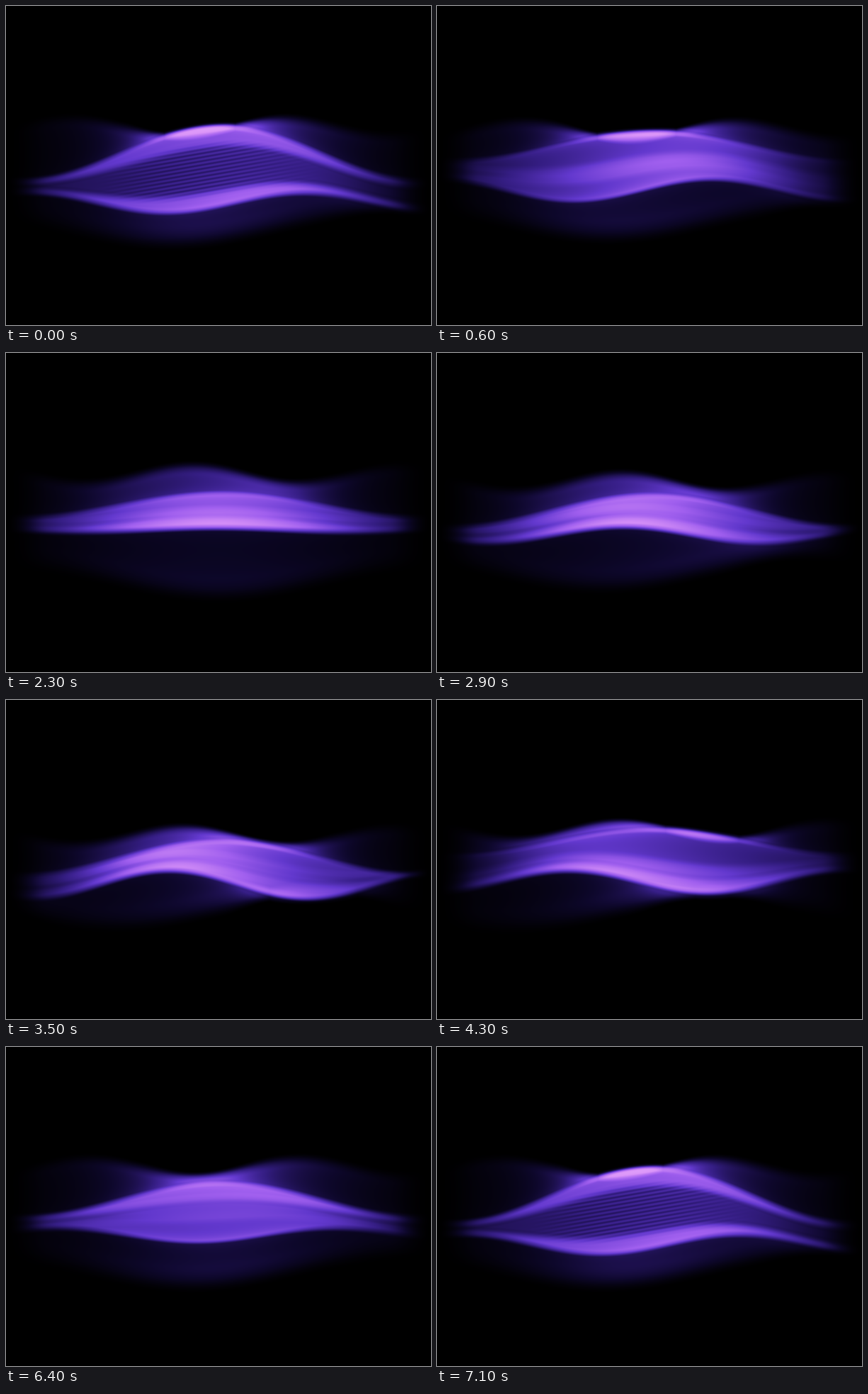
These frames come from a looping animation (600 by 450 pixels, 7.2 s). An HTML page with a canvas:

```html
<!DOCTYPE html>
<html lang="en">
<head>
<meta charset="utf-8">
<title>Violet wave</title>
<style>
  html, body { margin: 0; height: 100%; overflow: hidden; background: #000; }
  canvas { display: block; width: 600px; height: 450px; }
</style>
</head>
<body>
<canvas id="stage" width="600" height="450"></canvas>
<script>
const W = 600, H = 450, MID = W / 2, LOOP = 7200, STEP = 100, TAU = Math.PI * 2;
const ctx = document.getElementById('stage').getContext('2d');
const image = ctx.createImageData(W, H);
const light = new Float32Array(W * H);

const clamp = v => Math.min(1, Math.max(0, v));
const mix = (a, b, u) => a + (b - a) * u;
const smooth = v => { v = clamp(v); return v * v * (3 - 2 * v); };

// Turning points of the swell; every track below has one key at each.
const moments = [0, 1300, 2300, 3500, 5200, 6400];

// Looping smooth curve through keys; drift is the gain over one whole loop.
function track(keys, drift = 0) {
  const n = keys.length;
  const key = i => {
    const turn = Math.floor(i / n), k = i - turn * n;
    return { time: moments[k] + turn * LOOP, value: keys[k] + turn * drift };
  };
  return time => {
    let i = n - 1;
    while (moments[i] > time) i--;
    const [p, a, b, q] = [i - 1, i, i + 1, i + 2].map(key);
    const span = b.time - a.time, u = (time - a.time) / span;
    const slopeA = (b.value - p.value) * span / (b.time - p.time);
    const slopeB = (q.value - a.value) * span / (q.time - a.time);
    return mix(a.value, b.value, smooth(u))
      + u * (1 - u) * (slopeA * (1 - u) - slopeB * u);
  };
}

// A fold is one sine wave: level, swell height, crest position, wavelength.
const fold = (level, swell, crest, length) => time => {
  const y = level(time), rise = swell(time), peak = crest(time);
  return x => y - rise * Math.cos(TAU * (x - peak) / length);
};

const rear = fold(
  track([172, 180, 173, 193, 172, 171]), () => 12,
  track([390, 470, 562, 550, 590, 715], 300), 300);
const upper = fold(
  track([207, 190, 214, 222, 178, 215]),
  track([38, 0, 17, 24, 12, 24]), () => 303, 560);
const lower = fold(
  track([277, 238, 249, 260, 251, 265]),
  track([14, 15, 3, 20, 8, 10]), time => 420 - 390 * time / LOOP, 390);
const front = fold(
  track([305, 290, 312, 288, 300, 306]), () => 22,
  track([530, 560, 600, 450, 390, 560]), 600);
const innerHigh = track([0.23, 0.7, 0.5, 0.4, 0.72, 0.27]);
const innerLow = track([0.82, 0.5, 0.75, 0.7, 0.9, 0.6]);

// Focus of the six folds from back to front, then the light of the sheets between them.
const edge = (soft, rim, width) => ({ soft, rim, width });
const edges = [edge(11, 0.3, 15), edge(4, 0.4, 9), edge(9, 0.2, 14),
  edge(10, 0.2, 14), edge(4, 0.5, 9), edge(20, 0.5, 22)];
const sheets = [0.42, 0.8, 0.72, 0.72, 0.22];

const ramp = [
  [0, 0, 0, 0],
  [0.1, 13, 7, 42],
  [0.3, 52, 29, 130],
  [0.55, 98, 56, 205],
  [0.85, 160, 95, 238],
  [1.3, 218, 148, 248],
  [2, 236, 178, 252]
];

// Thin sheets share one focus, so that folds cross without a seam.
function blendEdges(a, b, u) {
  return edge(mix(a.soft, b.soft, u), mix(a.rim, b.rim, u), mix(a.width, b.width, u));
}

function addSheet(x, k, yA, yB, gain) {
  const thick = Math.abs(yB - yA);
  const share = 0.5 - 0.5 * smooth(thick / 35);
  let top = blendEdges(edges[k], edges[k + 1], share);
  let bottom = blendEdges(edges[k + 1], edges[k], share);
  if (yA > yB) {
    [yA, yB] = [yB, yA];
    [top, bottom] = [bottom, top];
  }
  const power = gain * (40 / (thick + 12)) ** 0.8;
  const weave = k === 2 ? 0.2 * smooth((thick - 30) / 40) : 0;
  const end = Math.min(H - 1, Math.ceil(yB + bottom.soft));
  for (let y = Math.max(0, Math.floor(yA - top.soft)); y <= end; y++) {
    const dTop = y - yA, dBottom = yB - y;
    const mask = smooth(0.5 + dTop / (2 * top.soft)) * smooth(0.5 + dBottom / (2 * bottom.soft));
    const rims = top.rim * Math.exp(-Math.max(0, dTop) / top.width)
      + bottom.rim * Math.exp(-Math.max(0, dBottom) / bottom.width);
    const rows = 1 + weave * Math.sin(y * 1.15 + x * 0.2);
    light[y * W + x] += power * mask * (0.7 + rims) * rows;
  }
}

function paint() {
  const data = image.data;
  for (let i = 0; i < light.length; i++) {
    const v = Math.min(light[i], 1.99);
    let s = 0;
    while (v >= ramp[s + 1][0]) s++;
    const a = ramp[s], b = ramp[s + 1], u = (v - a[0]) / (b[0] - a[0]);
    for (let c = 0; c < 3; c++) data[i * 4 + c] = mix(a[c + 1], b[c + 1], u);
    data[i * 4 + 3] = 255;
  }
  ctx.putImageData(image, 0, 0);
}

function draw(time) {
  const [back, high, low, near] = [rear, upper, lower, front].map(f => f(time));
  const a = innerHigh(time), b = innerLow(time);
  light.fill(0);
  for (let x = 0; x < W; x++) {
    const fade = Math.exp(-(((x - MID) / 182) ** 2)) * smooth(Math.min(x, W - x) / 60);
    const top = high(x), bottom = low(x);
    const ys = [back(x), top, mix(top, bottom, a), mix(top, bottom, b), bottom, near(x)];
    sheets.forEach((gain, k) => addSheet(x, k, ys[k], ys[k + 1], gain * fade));
  }
  paint();
}

const start = performance.now();
let shown = -1;
function tick() {
  const elapsed = (performance.now() - start) % LOOP;
  const time = Math.floor(elapsed / STEP) * STEP;
  if (time !== shown) draw(shown = time);
  requestAnimationFrame(tick);
}
tick();
</script>
</body>
</html>
```
